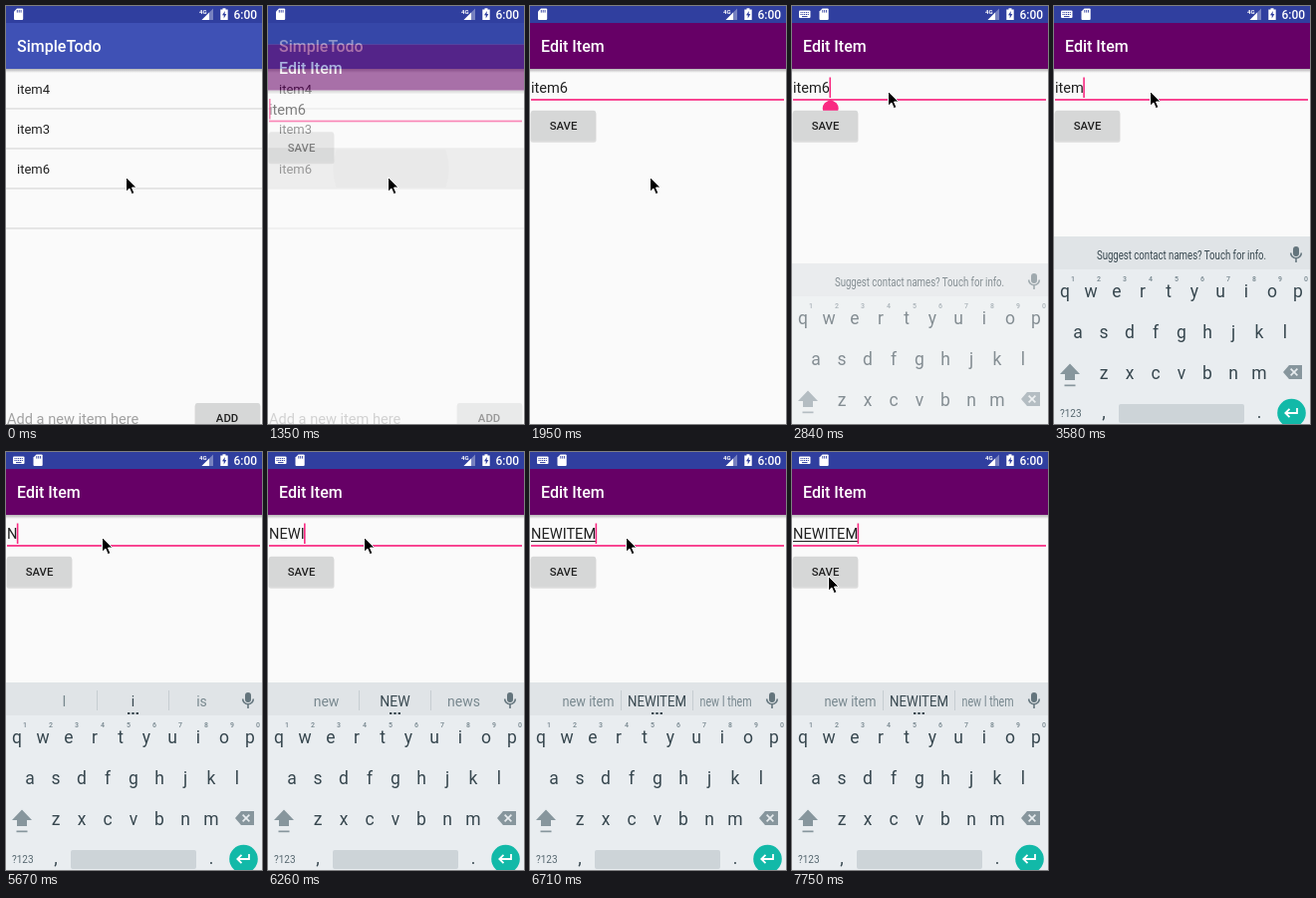
These frames come from a looping animation (257 px wide and 419 px high, 8000 ms). An HTML page:

```html
<!DOCTYPE html>
<html lang="en">
<head>
<meta charset="utf-8">
<title>Todo app</title>
<style>
  html, body { margin: 0; width: 100%; height: 100%; overflow: hidden; background: #fafafa; }
  svg { display: block; width: 257px; height: 419px; }
  text { font-family: Roboto, Arial, sans-serif; fill: #212121; }
  .title { font-size: 16px; font-weight: 500; fill: #fff; }
  .row { font-size: 13px; }
  .field { font-size: 14.6px; }
  .hint { font-size: 14.6px; fill: #a2a2a2; }
  .button { font-size: 11.3px; font-weight: 500; text-anchor: middle; }
  .clock { font-size: 12px; font-weight: 500; fill: #fff; }
  .key { font-size: 17.5px; fill: #37474f; text-anchor: middle; }
  .digit { font-size: 7px; font-weight: 500; fill: #75858d; text-anchor: middle; }
  .word { font-size: 14px; fill: #78888f; text-anchor: middle; }
  .word.main { fill: #37474f; }
  .accent { fill: #f92a82; }
</style>
</head>
<body>
<svg viewBox="0 0 257 419">
  <defs>
    <linearGradient id="shade" x2="0" y2="1">
      <stop offset="0" stop-opacity=".28"/>
      <stop offset="1" stop-opacity="0"/>
    </linearGradient>
    <clipPath id="rowClip"><rect y="143" width="257" height="40"/></clipPath>
    <g id="raised">
      <rect x=".5" y="1" width="66" height="31" rx="2.5" opacity=".12"/>
      <rect x="1" width="65" height="30" rx="2" fill="#d6d7d7"/>
    </g>
  </defs>

  <g id="list">
    <rect width="257" height="419" fill="#fafafa"/>
    <g id="ripple" clip-path="url(#rowClip)">
      <rect y="143" width="257" height="40" fill="#dedede"/>
      <circle cx="123.5" cy="163" r="58" fill="#d6d6d6"/>
    </g>
    <g id="rows"></g>
    <rect y="63" width="257" height="4" fill="url(#shade)"/>
    <rect y="17" width="257" height="46" fill="#3f51b5"/>
    <text class="title" x="11" y="46.3">SimpleTodo</text>
    <text class="hint" x="1" y="419">Add a new item here</text>
    <use href="#raised" x="189" y="398"/>
    <text class="button" x="222" y="417">ADD</text>
  </g>

  <g id="edit">
    <rect y="17" width="257" height="402" fill="#fafafa"/>
    <rect y="-30" width="257" height="47" fill="#303f9f"/>
    <rect y="63" width="257" height="4" fill="url(#shade)"/>
    <rect y="17" width="257" height="46" fill="#660066"/>
    <text class="title" x="11" y="46.3">Edit Item</text>
    <text class="hint" id="editHint" x="1" y="87.3">Enter new item here</text>
    <text class="field" id="field" x="1" y="87.3"></text>
    <rect id="under" x="1" y="89" height="1" fill="#212121"/>
    <rect class="accent" x="1" y="93.1" width="254" height="1.7"/>
    <rect class="accent" id="caret" y="71.5" width="1.6" height="20.5"/>
    <path class="accent" id="handle" d="M38.7 93.5 L44.6 97.2 A8 8 0 1 1 32.8 97.2 Z"/>
    <use href="#raised" y="104.8"/>
    <text class="button" x="33.5" y="124">SAVE</text>
  </g>

  <g id="board">
    <rect y="231" width="257" height="33" fill="#e0e4e7"/>
    <rect y="264" width="257" height="155" fill="#e9edf0"/>
    <text id="notice" x="0" y="0" font-size="12.5" text-anchor="middle" style="fill:#37474f"
      transform="translate(128 253.7) scale(.77 1)">Suggest contact names? Touch for info.</text>
    <g id="strip">
      <path d="M91.5 239V259M163.5 239V259" stroke="#c6cdd1"/>
      <path d="M122 262h2.4M126.3 262h2.4M130.6 262h2.4" stroke="#37474f" stroke-width="2.2"/>
      <text class="word"></text>
      <text class="word main"></text>
      <text class="word"></text>
    </g>
    <g fill="none" stroke="#64757d" stroke-width="1.6">
      <rect x="240.8" y="241.8" width="4.4" height="8.4" rx="2.2" fill="#64757d"/>
      <path d="M237.7 247.5a5.3 5.3 0 0 0 10.6 0M243 253v4"/>
    </g>
    <g id="keys"></g>
    <g fill="#87969d">
      <path d="M16 358.5 26 369H21V375H11V369H6Z"/>
      <rect x="10.5" y="379.5" width="11" height="1.7"/>
      <path d="M236 360H249V374H236L230 367Z"/>
    </g>
    <path d="M237.6 363.6l6.8 6.8M244.4 363.6l-6.8 6.8" stroke="#e9edf0" stroke-width="1.6"/>
    <text x="6" y="411.5" font-size="10" style="fill:#56676f">?123</text>
    <text class="key" x="50" y="413">,</text>
    <text class="key" x="206" y="413">.</text>
    <rect x="65" y="399" width="126" height="19" rx="2" fill="#cdd4d8"/>
    <circle cx="238.5" cy="408" r="14.3" fill="#12b9a8"/>
    <path d="M244 403v5H232.5M236.5 403.8 232.3 408 236.5 412.2" fill="none" stroke="#fff" stroke-width="1.8"/>
  </g>

  <g id="status" fill="#fff">
    <rect width="257" height="17" fill="#303f9f"/>
    <g id="keyIcon">
      <rect x="7" y="4.5" width="11.5" height="7.5" rx="1"/>
      <path d="M8.5 6.6h8.5M8.5 8.5h8.5" stroke="#303f9f" stroke-width="1" stroke-dasharray="1.1 .7"/>
      <path d="M10 10.6h5.5" stroke="#303f9f"/>
    </g>
    <g id="card">
      <path d="M11 2.5H16.2a1 1 0 0 1 1 1V13a1 1 0 0 1-1 1H9a1 1 0 0 1-1-1V5.5Z"/>
      <path d="M11.3 4v2.6M13.2 4v2.6M15.1 4v2.6" stroke="#303f9f" stroke-width=".9"/>
    </g>
    <path d="M208 2.5V14H196.5Z" opacity=".35"/>
    <path d="M204 6.5V14H196.5Z"/>
    <text x="194" y="7.6" font-size="6" font-weight="700" style="fill:#fff">4G</text>
    <path d="M217.5 2.2h3v1.2h2.2V14h-7.4V3.4h2.2Z"/>
    <path d="M219.8 5 217 9.3h1.7V12.4L221.3 8h-1.7Z" fill="#303f9f"/>
    <text class="clock" x="228.5" y="12.6">6:00</text>
  </g>

  <path id="mouse" d="M.5 .5V15.2L3.9 12 6.3 17.6 8.9 16.5 6.5 11H11Z" fill="#000"
    stroke="#fff" stroke-width="1" stroke-linejoin="round"/>
</svg>

<script>
const LOOP = 8000;
const $ = id => document.getElementById(id);
const words = [...document.querySelectorAll('.word')];

function addText(parent, cls, x, y, str) {
  const el = document.createElementNS('http://www.w3.org/2000/svg', 'text');
  el.setAttribute('class', cls);
  el.setAttribute('x', x);
  el.setAttribute('y', y);
  el.textContent = str;
  parent.append(el);
}

function addLine(parent, y) {
  const el = document.createElementNS('http://www.w3.org/2000/svg', 'rect');
  const box = { y, width: 257, height: 1.4, fill: '#dcdcdc' };
  for (const k in box) el.setAttribute(k, box[k]);
  parent.append(el);
}

['item4', 'item3', 'item6', ''].forEach((str, i) => {
  addText($('rows'), 'row', 11, 87.6 + i * 40, str);
  addLine($('rows'), 102.2 + i * 40);
});

[['qwertyuiop', 11, 291.8], ['asdfghjkl', 24, 332.5], ['zxcvbnm', 50, 374]].forEach(([row, x, y]) => {
  [...row].forEach((ch, i) => addText($('keys'), 'key', x + i * 26, y, ch));
});
[...'1234567890'].forEach((ch, i) => addText($('keys'), 'digit', 19 + i * 26, 275.6, ch));

const start = {
  ripple: false, editAlpha: 0, editY: 0, text: 'item6', caret: true, caretAtEnd: false,
  under: false, handle: false, boardAlpha: 0, boardY: 0, words: null, bold: false, mouse: [120, 171]
};

// Each step changes part of the state from its time on.
const steps = [
  [1350, { ripple: true, editAlpha: .55, editY: 21.5 }],
  [1500, { editAlpha: 1, editY: 3 }],
  [1650, { editY: 0 }],
  [1950, { caret: false }],
  [2100, { mouse: [117, 151] }],
  [2250, { mouse: [108, 116] }],
  [2400, { mouse: [98, 89] }],
  [2540, { mouse: [96, 85], caret: true }],
  [2840, { caretAtEnd: true, handle: true, boardAlpha: .6, boardY: 27 }],
  [2990, { boardAlpha: 1, boardY: 0 }],
  [3280, { caret: false }],
  [3580, { text: 'item', caret: true, handle: false }],
  [3730, { under: true, words: ['items', 'item', 'item\'s'], bold: true }],
  [3880, { text: 'ite' }],
  [4030, { words: ['it', 'ite', 'item'], bold: false }],
  [4320, { text: 'it' }],
  [4470, { words: ['if', 'it', 'of'], bold: true }],
  [4770, { text: 'i', words: ['I', 'i', 'is'], bold: false }],
  [5070, { text: '', under: false }],
  [5670, { text: 'N' }],
  [5820, { words: ['n', 'N', 'no'] }],
  [5970, { text: 'NE' }],
  [6110, { text: 'NEW', words: ['be', 'NE', 'new'] }],
  [6260, { text: 'NEWI', words: ['new', 'NEW', 'news'] }],
  [6410, { text: 'NEWIT', words: ['new I', 'NEWI', 'newer'] }],
  [6560, { text: 'NEWITE', words: ['new it', 'NEWIT', 'new I t'] }],
  [6710, { text: 'NEWITEM', under: true, words: ['new item', 'NEWITEM', 'new I them'] }],
  [7160, { caret: false }],
  [7450, { caret: true, mouse: [84, 95] }],
  [7600, { mouse: [50, 116] }],
  [7750, { mouse: [36, 124] }]
];

const show = (id, on) => { $(id).style.display = on ? '' : 'none'; };
const move = (id, x, y) => $(id).setAttribute('transform', `translate(${x} ${y})`);

function drawWords(s) {
  show('strip', s.words);
  show('notice', !s.words);
  if (!s.words) return;
  words.forEach((el, i) => {
    el.textContent = s.words[i];
    el.style.fontWeight = i === 1 && s.bold ? 700 : 400;
    // long suggestions are condensed to their slot
    const room = i === 1 ? 59 : 52;
    const squeeze = Math.min(1, room / el.getComputedTextLength());
    el.setAttribute('transform', `translate(${58.5 + i * 69} 255) scale(${squeeze} 1)`);
  });
}

function draw(s) {
  show('ripple', s.ripple);
  show('edit', s.editAlpha > 0);
  $('edit').setAttribute('opacity', s.editAlpha);
  move('edit', 0, s.editY);

  $('field').textContent = s.text;
  const width = s.text ? $('field').getComputedTextLength() : 0;
  show('editHint', !s.text);
  show('caret', s.caret);
  $('caret').setAttribute('x', s.caretAtEnd ? width + .4 : 1);
  show('under', s.under);
  $('under').setAttribute('width', width);
  show('handle', s.handle);

  const typing = s.boardAlpha > 0;
  show('board', typing);
  $('board').setAttribute('opacity', s.boardAlpha);
  move('board', 0, s.boardY);
  drawWords(s);

  show('keyIcon', typing);
  move('card', typing ? 19.5 : 0, 0);
  move('mouse', ...s.mouse);
}

let last = -1;
function tick() {
  const t = performance.now() % LOOP;
  const past = steps.filter(([at]) => at <= t);
  if (past.length !== last) {
    last = past.length;
    draw(Object.assign({}, start, ...past.map(([, change]) => change)));
  }
  requestAnimationFrame(tick);
}
tick();
</script>
</body>
</html>
```
